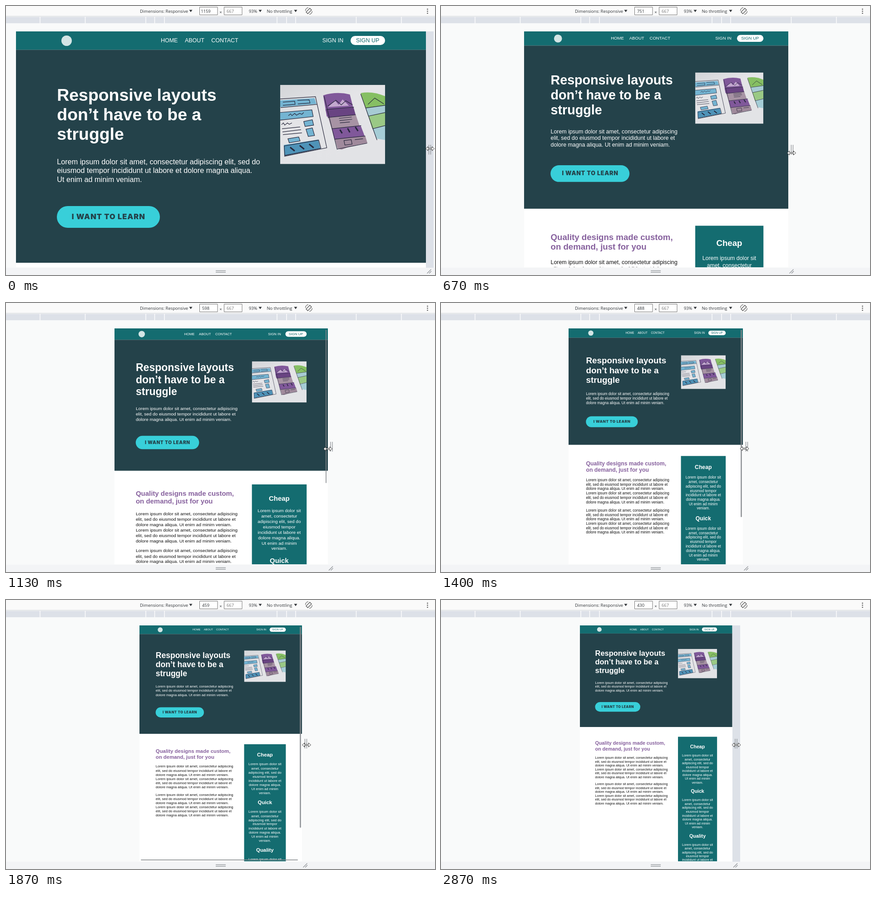
An HTML page for the animation above (3470 ms loop, 945x593 px).

```html
<!DOCTYPE html>
<html lang="en">
<head>
<meta charset="utf-8">
<title>Responsive resize</title>
<style>
html, body { margin: 0; width: 100%; height: 100%; overflow: hidden; }
body { position: relative; background: #f9fafa; font: 16.2px/19.4px "Liberation Sans", Arial, sans-serif; }
body > *, .abs { position: absolute; }
#chrome, #tools { left: 0; top: 0; }
#chrome text { font: 9.4px "Open Sans", sans-serif; fill: #303438; }
#view { top: 56px; height: 520px; background: #fff; overflow: hidden; }
#strip { top: 56px; width: 17px; height: 521px; background: #dde1e8; }
#page { left: 0; top: 0; height: 1290px; transform-origin: 0 0; }
.bar { position: absolute; background: #85898ccc; border-radius: 2px; }
nav, .hero { position: absolute; left: 0; width: 100%; }
nav { top: 0; height: 40px; background: #146c70; border-bottom: 1px solid #47767a; }
.hero { top: 41px; height: 469px; background: #24424a; }
.box { position: absolute; left: 10%; width: 80%; top: 0; }
nav .box { color: #fff; font-size: 12.47px; line-height: 14px; white-space: nowrap; }
nav .abs { top: 12.5px; }
nav .links { left: calc(50% - 132.5px); display: flex; gap: 15.5px; }
nav .in { right: 91.5px; }
nav .up { right: 0; top: 9.5px; width: 76px; line-height: 20.5px; border-radius: 11px; text-align: center; background: #fff; color: #146c70; }
nav .logo { left: 10px; top: 8.5px; width: 23px; height: 23px; border-radius: 50%; background: #d3e5e5; }
.text { left: 0; width: 62.2%; }
.side { left: 68%; width: 32%; }
h1, h2, p { margin: 0; }
h1 { top: 119px; color: #fff; font-size: 37.4px; line-height: 43px; white-space: nowrap; }
h2 { font-size: 24.3px; line-height: 28px; margin-bottom: 20.2px; }
.lead { top: 277.8px; color: #fff; }
.cta { top: 385px; width: 227px; line-height: 47.5px; border-radius: 24px; text-align: center; white-space: nowrap; background: #38cfd9; color: #24424a; font-family: Inter, sans-serif; font-size: 16.4px; font-weight: 900; letter-spacing: 1px; }
.photo { top: 118.3px; display: block; }
.copy { top: 578.3px; color: #111; }
.copy h2 { color: #86609d; white-space: nowrap; }
.copy p { margin-bottom: 16.2px; }
.cards { top: 559px; height: 731px; box-sizing: border-box; padding: 36.3px 16.2px 0; background: #146c70; color: #fff; text-align: center; }
.cards p { margin-bottom: 20.2px; }
</style>
</head>
<body>
<svg id="chrome" width="945" height="593">
  <path fill="#f3f4f6" d="M0 577h945v16H0z"/>
  <path fill="#fafafa" d="M0 0h945v22H0z"/>
  <path fill="#cfd3d8" d="M0 22h945v1H0z"/>
  <path fill="#dde1e8" d="M0 24h945v14H0z"/>
  <path id="ticks" stroke="#fff" stroke-width="1.4"/>
  <g fill="#fff" stroke="#777"><path d="M426.5 2.5h39.5v17h-39.5zM480.5 2.5h39.5v17h-39.5z"/></g>
  <text x="295" y="14.5">Dimensions: Responsive</text>
  <text x="440" y="14.5" text-anchor="middle" id="width"></text>
  <text x="473" y="16.5" text-anchor="middle">×</text>
  <text x="486" y="14.5" style="fill:#777">667</text>
  <text x="535" y="14.5">93%</text>
  <text x="574.5" y="14.5">No throttling</text>
  <path fill="#303438" d="M403.5 8.500h7l-3.500 5zM556.500 8.500h7l-3.500 5zM634.500 8.500h7l-3.500 5z"/>
  <g transform="translate(667 11) scale(-1.1 1.1)" fill="none" stroke="#555" stroke-width="1.1">
    <path d="M-2-5.500L5.500 2 2 5.500-5.500-2zM1-6.800A6.800 6.800 0 0 1 6.800-.5M-1 6.800A6.800 6.800 0 0 1-6.800.5"/>
  </g>
  <g fill="#555"><circle cx="928.5" cy="7" r="1.3"/><circle cx="928.5" cy="11.5" r="1.3"/><circle cx="928.5" cy="16" r="1.3"/></g>
  <path stroke="#999da1" stroke-width="1.3" d="M462 583.5h22M462 587h22"/>
</svg>

<div id="strip"></div>
<div id="view">
  <div id="page" class="abs">
    <nav><div class="box">
      <div class="abs logo"></div>
      <div class="abs links"><span>HOME</span><span>ABOUT</span><span>CONTACT</span></div>
      <div class="abs in">SIGN IN</div>
      <div class="abs up">SIGN UP</div>
    </div></nav>
    <div class="hero"></div>
    <div class="box">
      <h1 class="abs">Responsive layouts<br>don’t have to be a<br>struggle</h1>
      <p class="abs text lead"></p>
      <div class="abs cta">I WANT TO LEARN</div>
      <svg class="abs side photo" viewBox="0 0 232 175">
        <defs><linearGradient id="paper" x2=".6" y2="1"><stop stop-color="#d3d5d8"/><stop offset=".4" stop-color="#e4e4e7"/><stop offset="1" stop-color="#e2e3e6"/></linearGradient></defs>
        <path fill="url(#paper)" d="M0 0h232v175H0z"/>
        <g fill="#74b4d2">
          <path d="M0 34l76-5 4 13-80 7zM0 61l70-6 3 15-73 8zM52 81l19-4 3 12-19 3zM57 98l14-3 5 17-14 2zM17 119l24-4 3 9-24 4z"/>
          <path fill="#4f93b8" d="M8 133l76-12 5 20-80 16z"/>
        </g>
        <g fill="#80589a">
          <path d="M95 23q30-9 59-2l11 43-62 6z"/>
          <path fill="#694482" d="M100 54l62-5 5 18-61 7z"/>
          <path fill="#a793a4" d="M106 72l61-6 9 26-62 6z"/>
          <path d="M114 97l64-7 9 24-67 7z"/>
          <path fill="#a08a9c" d="M121 120l67-7 5 16q-30 3-57 14l-9-2z"/>
          <path fill="#c3a9cf" d="M106 49l15-15 8 10 9-12 14 14z"/>
        </g>
        <g fill="#86bf63">
          <path d="M178 18q26-5 54 7v22l-43 4z"/>
          <path fill="#a7cbd3" d="M189 51l43-6v17l-38 7z"/>
          <path fill="#9ac985" d="M195 69l37-8v29l-29 6z"/>
          <path fill="#a5cdd6" d="M204 97l28-7v32l-18-3z"/>
        </g>
        <g fill="none" stroke="#25263a" stroke-width="1.2">
          <path d="M0 31l78-5 25 113-94 19M1 50l80-7M0 61l70-6 3 15-73 8M6 38l26-2 1 7-27 2M38 34l26-1 2 7-27 2M18 68l5-4 3 4 6-5 4 4 7-4 5 2 4-4M3 88l4-4 3 5 6-5 4 3 6-3M4 97l40-4M5 104l41-5M6 110l42-4M52 81l19-4 3 12-19 3zM57 98l14-3 5 17-14 2zM17 119l24-4 3 9-24 4zM9 135l76-13 5 18-80 16z"/>
          <path d="M97 25l29 118M106 72l61-6M103 54l60-5M114 97l65-7M121 120l67-7M126 142l66-13M130 74l28-3M131 79l28-3M132 84l22-2M141 123l16-2 2 10-16 2zM165 121l18-2M105 47l18-13 12 10 10-9 15 9M178 20l36 102M189 51l43-6M195 69l37-8M204 97l28-7M194 43l15-14 20 13"/>
          <path stroke-width="3" d="M132 99l5 8M149 96l5 9M166 93l6 9M22 138l10 8M43 134l10 8M64 131l10 8"/>
        </g>
      </svg>
      <div class="abs text copy"><h2>Quality designs made custom,<br>on demand, just for you</h2></div>
      <div class="abs side cards"></div>
    </div>
  </div>
  <div id="vbar" class="bar" style="top:2.5px;width:2.5px"></div>
  <div id="hbar" class="bar" style="left:3px;top:515.5px;height:2.5px"></div>
</div>

<svg id="tools" width="945" height="593">
  <path id="grip" stroke="#8f9397" stroke-width="1.3" d="M6.500 306v21.500M10.500 306v21.500M2.500 589.500l9-9M7 589.500l5-5"/>
  <path id="cursor" fill="#fff" stroke="#222" stroke-width=".9" d="M-9.500 0l5-4.500v3.300h9v-3.300l5 4.500-5 4.500v-3.300h-9v3.300z"/>
</svg>

<script>
const $ = id => document.getElementById(id);
const lorem = "Lorem ipsum dolor sit amet, consectetur adipiscing elit, sed do eiusmod tempor incididunt ut labore et dolore magna aliqua. Ut enim ad minim veniam.";
const para = n => `<p>${Array(n).fill(lorem).join(" ")}</p>`;
document.querySelector(".lead").textContent = lorem;
document.querySelector(".copy").innerHTML += para(2) + para(2);
document.querySelector(".cards").innerHTML =
  ["Cheap", "Quick", "Quality"].map(h => `<h2>${h}</h2>` + para(1)).join("");
$("ticks").setAttribute("d",
  [75, 174.5, 308, 327.5, 349, 597, 618, 638, 771.5, 871].map(x => `M${x} 24v14`).join(""));

const LOOP = 3470, FRAME = 1000 / 15, MIN_PAGE = 764;
// time, device width, view left, view right, page width, cursor x, cursor y
const keys = [
  [0, 1159, 22, 925, 903, 934, 314.5],
  [67, 1140, 29, 918, 889, 925, 315],
  [345, 982, 90, 856.5, 766.5, 850, 321],
  [400, 951, 102, 843, 766.5, 836, 322],
  [533, 895, 124, 823, 699, 819, 323],
  [667, 751, 183, 765, 585.5, 772, 324],
  [1067, 628, 229, 718, 489, 717, 322],
  [1133, 598, 239, 708.5, 470, 709, 321.5],
  [1400, 488, 281, 665, 384.4, 668.5, 321],
  [1600, 488, 281, 665, 384.4, 668.5, 321],
  [1867, 459, 294, 652, 358, 662, 319.5],
  [2133, 450, 298, 648, 350, 657, 319.5],
  [2667, 430, 306, 641.5, 335.5, 650.5, 319.5],
  [LOOP, 430, 306, 641.5, 335.5, 650.5, 319.5]
];

function pose(t) {
  const i = Math.max(1, keys.findIndex(k => k[0] >= t));
  const a = keys[i - 1], b = keys[i], f = (t - a[0]) / (b[0] - a[0]);
  return a.map((v, j) => v + (b[j] - v) * f);
}

function draw(time) {
  const frame = Math.floor((time + 3.5) / FRAME), t = Math.round(frame * FRAME);
  const [, width, left, right, page, cx, cy] = pose(Math.min(t, LOOP));
  const layout = Math.max(MIN_PAGE, page), scale = page / layout;
  $("width").textContent = Math.round(width);
  $("view").style.left = left + "px";
  $("view").style.width = right - left + "px";
  $("page").style.width = layout + "px";
  $("page").style.transform = `scale(${scale})`;

  $("strip").style.left = right + "px";
  $("strip").hidden = t >= 67 && t < 2667;
  $("vbar").style.left = right - left - 5 + "px";
  $("vbar").style.height = 208 / scale + "px";
  $("vbar").style.opacity = t < 1067 ? 0 : Math.min(1, Math.max(0, (43 - frame) / 3));
  $("hbar").style.width = right - left - 12 + "px";
  $("hbar").hidden = t < 1800 || t >= 2133;

  $("grip").setAttribute("transform", `translate(${right} 0)`);
  $("cursor").setAttribute("transform", `translate(${cx} ${cy})`);
}

const start = performance.now();
(function tick() {
  draw((performance.now() - start) % LOOP);
  requestAnimationFrame(tick);
})();
</script>
</body>
</html>
```
